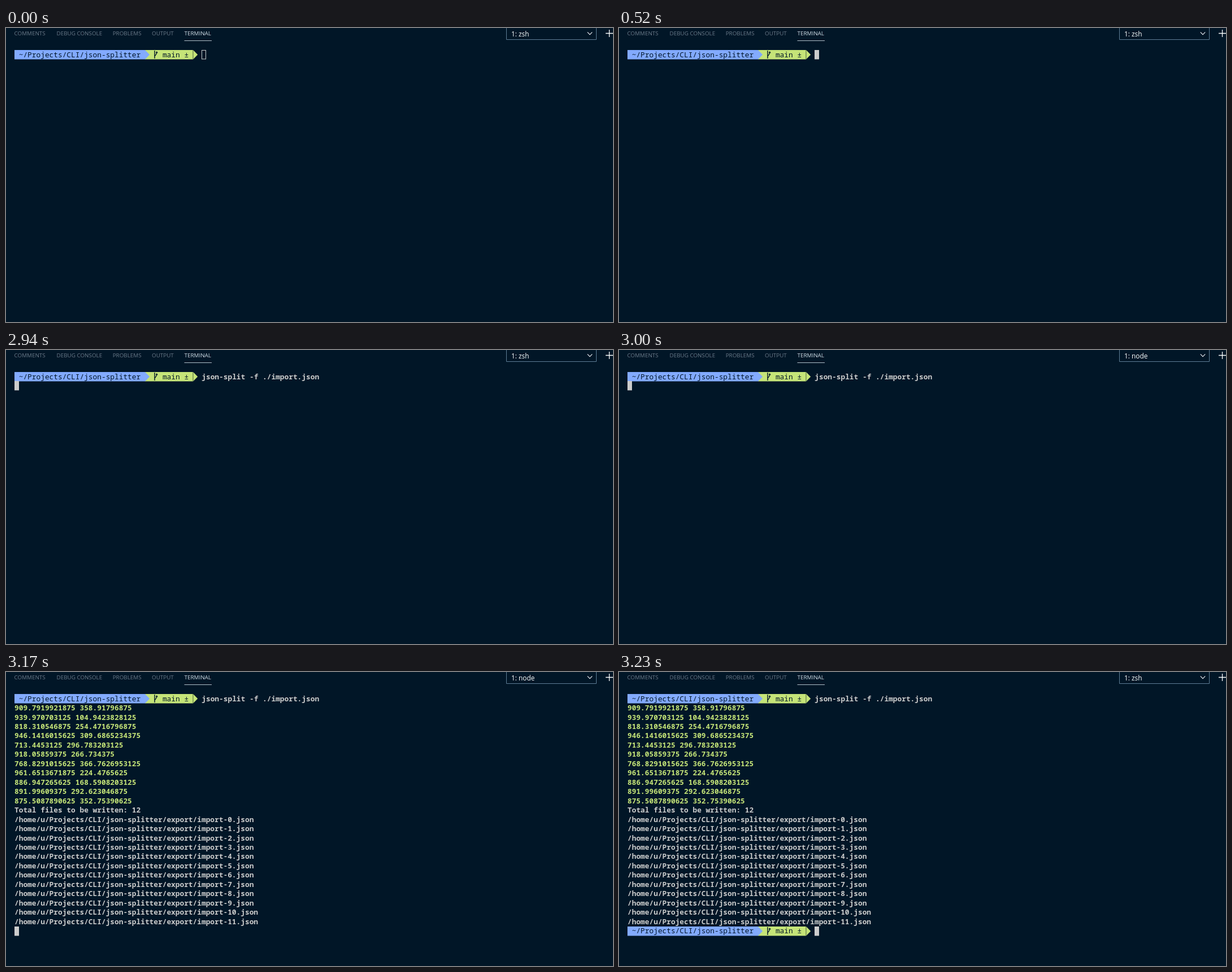
Recreate the animation shown at these times as an HTML page. Size 1074 by 521 pixels, loop 5190 ms.

```html
<!DOCTYPE html>
<html lang="en">
<head>
<meta charset="utf-8">
<title>Terminal</title>
<style>
  html, body { margin: 0; width: 100%; height: 100%; overflow: hidden; background: #011627; }
  svg { display: block; }
  text { white-space: pre; }
  .mono { font: 600 12.84px "Noto Sans Mono", "DejaVu Sans Mono", monospace; fill: #ccc; font-variant-ligatures: none; }
  .mono.prompt { font-weight: 400; fill: #011627; }
  .mono.green { fill: #c5e478; }
  .tab { font: 9.85px "Open Sans", "Noto Sans", sans-serif; fill: #6c7a89; }
  .tab.on { fill: #d2dee7; }
  .pick { font: 11.9px "Open Sans", "Noto Sans", sans-serif; fill: #fff; }
</style>
</head>
<body>
<svg id="stage" width="1074" height="521" viewBox="0 0 1074 521">
  <rect width="1074" height="521" fill="#011627"/>
</svg>
<script>
const LOOP = 5190;
const LEFT = 15, TOP = 39, CELL = 7.704, ROW = 16.46;
const INK = '#011627', BLUE = '#82aaff', GREEN = '#c5e478', GREY = '#ccc';
const stage = document.getElementById('stage');

function add(parent, tag, attrs, text) {
  const el = document.createElementNS('http://www.w3.org/2000/svg', tag);
  for (const key in attrs) el.setAttribute(key, attrs[key]);
  if (text) el.textContent = text;
  parent.append(el);
  return el;
}

const group = () => add(stage, 'g', {});
const colX = col => LEFT + col * CELL;
const rowY = row => TOP + row * ROW;
const stroke = (parent, d, color, width = 1) =>
  add(parent, 'path', { d, fill: 'none', stroke: color, 'stroke-width': width });
const write = (parent, row, col, text, style = '') =>
  add(parent, 'text', { x: colX(col), y: rowY(row) + 12.6, class: 'mono ' + style }, text);

function drawHeader() {
  const tabs = [['COMMENTS', 14.5], ['DEBUG CONSOLE', 89.5], ['PROBLEMS', 188.7], ['OUTPUT', 258], ['TERMINAL', 315.5]];
  for (const [name, x] of tabs)
    add(stage, 'text', { x, y: 13.3, class: name === 'TERMINAL' ? 'tab on' : 'tab' }, name);
  stroke(stage, 'M315.5 22.5H364', '#b4c0ca');
  stroke(stage, 'M885.5 0V20.5H1044.5V0', '#5f7e97');
  stroke(stage, 'M1028.8 7.4L1033 11.6L1037.2 7.4', '#e4e9ee', 1.2);
  stroke(stage, 'M1061 9.5H1074M1067.5 3V16', '#fff', 1.3);
  return add(stage, 'text', { x: 894, y: 15, class: 'pick' });
}

function drawPrompt(parent, row) {
  const y = Math.round(rowY(row)), h = 16.5, mid = y + h / 2;
  const a = colX(30), b = colX(41);
  const tip = (x, fill) =>
    add(parent, 'path', { d: `M${x} ${y}L${x + 8} ${mid}L${x} ${y + h}Z`, fill });
  add(parent, 'rect', { x: LEFT, y, width: a - LEFT + .3, height: h, fill: BLUE });
  add(parent, 'rect', { x: a, y, width: b - a, height: h, fill: GREEN });
  tip(a, BLUE);
  tip(b + .3, GREEN);
  stroke(parent, `M${b} ${y}v${h}`, '#52683f', .7);
  write(parent, row, 1, '~/Projects/CLI/json-splitter', 'prompt');
  // branch glyph
  stroke(parent, `M263 ${y + 1}v14M263 ${y + 12}C263 ${y + 8.5} 266.7 ${y + 9.5} 266.7 ${y + 4}`, INK, 1.4);
  add(parent, 'path', { d: `M264.6 ${y + 5.2}L266.7 ${y + 2}L268.8 ${y + 5.2}Z`, fill: INK });
  write(parent, row, 34, 'main ±', 'prompt');
}

const picker = drawHeader();
drawPrompt(stage, 0);

const command = group();
write(command, 0, 43, 'json-split -f ./import.json');

const report = group();
[
  '909.7919921875 358.91796875', '939.970703125 104.9423828125',
  '818.310546875 254.4716796875', '946.1416015625 309.6865234375',
  '713.4453125 296.783203125', '918.05859375 266.734375',
  '768.8291015625 366.7626953125', '961.6513671875 224.4765625',
  '886.947265625 168.5908203125', '891.99609375 292.623046875',
  '875.5087890625 352.75390625'
].forEach((line, i) => write(report, i + 1, 0, line, 'green'));
write(report, 12, 0, 'Total files to be written: 12');

const files = Array.from({ length: 12 }, (_, i) =>
  write(stage, 13 + i, 0, `/home/u/Projects/CLI/json-splitter/export/import-${i}.json`));

const nextPrompt = group();
drawPrompt(nextPrompt, 25);

const cursor = add(stage, 'rect', { width: 7, height: 15.5, stroke: GREY });

// typed: command shown, files: paths listed, row/col: cursor cell
const steps = [
  { at: 0, row: 0, col: 43, hollow: true },
  { at: 520, row: 0, col: 43 },
  { at: 1380, row: 0, col: 70, typed: true },
  { at: 2940, row: 1, col: 0, typed: true },
  { at: 3000, row: 1, col: 0, typed: true, node: true },
  { at: 3090, row: 14, col: 0, typed: true, node: true, files: 1 },
  { at: 3170, row: 25, col: 0, typed: true, node: true, files: 12 },
  { at: 3230, row: 25, col: 43, typed: true, files: 12, done: true }
];

const show = (el, on) => el.setAttribute('visibility', on ? 'visible' : 'hidden');
let current;

function render(step) {
  const count = step.files || 0;
  picker.textContent = step.node ? '1: node' : '1: zsh';
  show(command, step.typed);
  show(report, count > 0);
  files.forEach((el, i) => show(el, i < count));
  show(nextPrompt, step.done);
  cursor.setAttribute('x', Math.floor(colX(step.col)) + .5);
  cursor.setAttribute('y', Math.round(rowY(step.row)) + .5);
  cursor.setAttribute('fill', step.hollow ? 'none' : GREY);
}

function tick() {
  const time = performance.now() % LOOP;
  const step = steps.findLast(s => s.at <= time);
  if (step !== current) render(current = step);
  requestAnimationFrame(tick);
}
tick();
</script>
</body>
</html>
```
